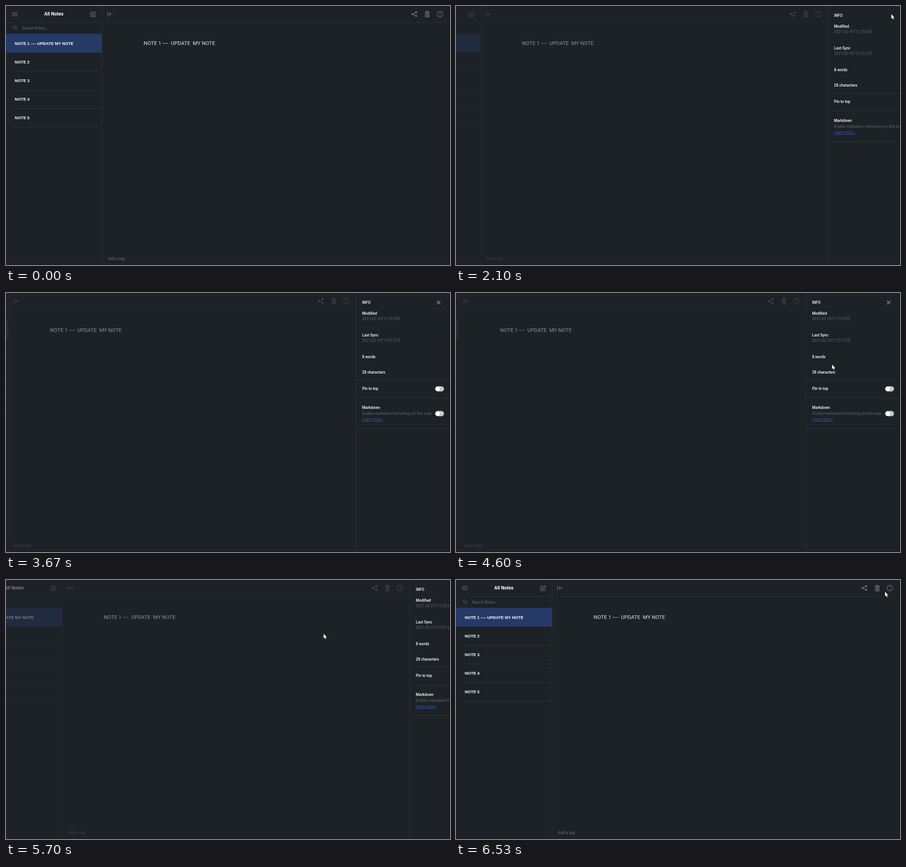
Recreate the animation shown at these times as an HTML page with a canvas. Size 978 by 572 pixels, loop 6590 ms.

```html
<!DOCTYPE html>
<html lang="en">
<head>
<meta charset="utf-8">
<title>Notes</title>
<style>
html, body { margin: 0; width: 100%; height: 100%; overflow: hidden; background: #1d2226; }
canvas { display: block; width: 978px; height: 572px; }
</style>
</head>
<body>
<canvas id="stage" width="978" height="572"></canvas>
<script>
const ctx = document.getElementById('stage').getContext('2d');
const W = 978, H = 572, LOOP = 6590, PANEL = 206, PAD = 13.4;
const BG = '#1d2226', RULE = '#2b3135', MUTED = '#6d7175', ICON = '#777b7f', LINK = '#3556ad';
const SANS = 'Roboto, sans-serif', ARIAL = '"Liberation Sans", Arial, sans-serif';
const OPEN = 1964, CLOSE = 5591, SLIDE = 200;
const WANDER = 2330, LEAVE = 5030;

// Pointer keys: time, x, y of the tip
const keys = [
  [1630, 967, 12], [2100, 959, 18], [WANDER, 915, 24],
  [LEAVE, 865, 103], [5170, 892, 56], [5430, 629, 150],
  [5570, 629, 150], [5700, 699, 119], [6120, 945, 26], [LOOP, 945, 26]
];

const info = [
  { s: 'INFO', y: 21, head: true },
  { s: 'Modified', y: 44.8, head: true },
  { s: '2021-02-19T17:35:59Z', y: 57.2 },
  { s: 'Last Sync', y: 93.2, head: true },
  { s: '2021-02-19T17:51:37Z', y: 105.4 },
  { s: '8 words', y: 141.5, head: true },
  { s: '28 characters', y: 175, head: true },
  { s: 'Pin to top', y: 211, head: true },
  { s: 'Markdown', y: 253.4, head: true },
  { s: 'Enable markdown formatting on this note.', y: 266.3 }
];

const clamp = v => Math.max(0, Math.min(1, v));
const smooth = v => { v = clamp(v); return v * v * (3 - 2 * v); };
const mix = (a, b, p) => a + (b - a) * p;
const slide = t => PANEL * (smooth((t - OPEN) / SLIDE) - smooth((t - CLOSE) / SLIDE));

function text(s, x, y, size, color, weight = 400, family = SANS) {
  ctx.font = `${weight} ${size}px ${family}`;
  ctx.fillStyle = color;
  ctx.fillText(s, x, y + size * 0.355);
}

function rect(x, y, w, h, color) {
  ctx.fillStyle = color;
  ctx.fillRect(x, y, w, h);
}

function stroke(d, color = ICON, width = 1.1) {
  ctx.strokeStyle = color;
  ctx.lineWidth = width;
  ctx.stroke(new Path2D(d));
}

function dot(x, y, r, color) {
  ctx.fillStyle = color;
  ctx.beginPath();
  ctx.arc(x, y, r, 0, 7);
  ctx.fill();
}

function ring(x, y, r) {
  ctx.strokeStyle = ICON;
  ctx.lineWidth = 1.1;
  ctx.beginPath();
  ctx.arc(x, y, r, 0, 7);
  ctx.stroke();
}

function sidebar() {
  stroke('M13.3 14.5h12.4m-12.4 3.5h12.4m-12.4 3.5h12.4');
  text('All Notes', 84.3, 17.7, 10.29, '#fff', 700);
  stroke('M192.5 13.3h-6v10.4h10v-5M188.5 16.5h4m-4 2.2h6m-6 2.2h6M195.6 12v5.4m-2.7-2.7h5.4', ICON, 1);

  ctx.save();
  ctx.globalAlpha *= 0.65;
  ring(19.2, 47.2, 3.2);
  stroke('M21.6 49.6l3.4 3.4');
  ctx.restore();
  text('Search Notes…', 34.8, 48.5, 8.6, '#63686c');

  rect(0, 61.5, 211, 41.5, '#263a68');
  ['1 ---- UPDATE MY NOTE', '2', '3', '4', '5'].forEach((s, i) => {
    const y = 82.5 + i * 41.15;
    text('NOTE ' + s, 19.2, y, 9, '#fff', 700, ARIAL);
    if (i) rect(19, Math.round(y + 20.3), 192, 1, RULE);
  });
}

function toolbar() {
  stroke('M223.7 12.8v10.4m2.8-5.2h8.8m-5.3-3.3l-3.3 3.3l3.3 3.3');

  stroke('M903.4 13.9l-7.8 4.1l7.8 4.1');
  dot(903.4, 13.9, 2.1, ICON);
  dot(895.6, 18, 2.1, ICON);
  dot(903.4, 22.1, 2.1, ICON);

  stroke('M922.8 13.3h10.4m-7.2-1.1h4M924.2 15.6v8.4h7.6v-8.4zm2 2.1l3.6 3.8m0-3.8l-3.6 3.8', ICON, 1.3);

  ring(956, 18, 6.1);
  stroke('M956 17.3v3.9m0-6.6v1.3');

  text('Add a tag', 224.2, 557.8, 8.8, MUTED);
}

function toggle(y) {
  const x = PANEL - 31.8;
  ctx.fillStyle = '#c6c8ca';
  ctx.beginPath();
  ctx.roundRect(x, y - 5.8, 19.6, 11.6, 5.8);
  ctx.fill();
  dot(x + 5.8, y, 4.9, '#fff');
}

// Drawn with its left border at x = 0
function panel() {
  rect(0, 0, PANEL + 1, H, BG);
  rect(0, 0, 1, H, RULE);
  for (const y of [192, 232, 299]) rect(0, y, PANEL, 1, RULE);

  for (const { s, y, head } of info) {
    text(s, PAD, y, 8.3, head ? '#fff' : '#60656a', head ? 500 : 400);
  }
  text('Learn more…', PAD, 279.3, 8.3, LINK);
  rect(PAD, 283, 47, 1, LINK);

  stroke('M177.8 17l8.2 8.2m0-8.2l-8.2 8.2', '#a4a7aa');
  toggle(211.7);
  toggle(266.4);
}

// A shrinking, then growing, swing over the info lines
function wander(t) {
  const u = (t - WANDER) / 700;
  const reach = Math.abs(1 - u / 2.3);
  return [
    805 + 110 * reach * Math.cos(Math.PI * u) ** 2,
    160 - 136 * reach * Math.cos(2 * Math.PI * u)
  ];
}

function tip(t) {
  if (t > WANDER && t < LEAVE) return wander(t);
  const i = keys.findIndex(k => k[0] > t);
  const [t0, x0, y0] = keys[i - 1], [t1, x1, y1] = keys[i];
  const p = (t - t0) / (t1 - t0);
  return [mix(x0, x1, p), mix(y0, y1, p)];
}

// The text caret pointer is invisible on the dark panel
function overText(x, y, shift) {
  const dx = x - (W - shift);
  return shift === PANEL && dx > PAD && dx < 85 && info.some(l => Math.abs(y - l.y) < 7);
}

function pointer(t, shift) {
  if (t < keys[0][0]) return;
  const [x, y] = tip(t);
  if (overText(x, y, shift)) return;
  ctx.save();
  ctx.translate(x, y);
  stroke('M0 0v10l2.3-2l1.7 3.7l1.7-.7l-1.6-3.6h2.9z', '#0b0d0e', 1);
  ctx.fillStyle = '#fff';
  ctx.fill(new Path2D('M0 0v10l2.3-2l1.7 3.7l1.7-.7l-1.6-3.6h2.9z'));
  ctx.restore();
}

function draw(t) {
  const shift = slide(t);
  const dim = clamp(shift / 60);
  rect(0, 0, W, H, BG);

  ctx.save();
  ctx.translate(-shift, 0);
  ctx.globalAlpha = mix(1, 0.4, dim);
  rect(0, 36, W, 1, RULE);
  rect(211, 0, 1, H, RULE);
  sidebar();
  toolbar();
  ctx.globalAlpha = mix(1, 0.58, dim);
  text('NOTE 1 ----\u00a0 UPDATE\u00a0 MY NOTE', 303, 81.7, 11.57, '#e6e7e8');
  ctx.restore();

  ctx.save();
  ctx.translate(977 - shift, 0);
  panel();
  ctx.restore();

  rect(977, 0, 1, H, '#0a0c0d');
  rect(0, 571, W, 1, '#15191b');
  pointer(t, shift);
}

function tick() {
  draw(performance.now() % LOOP);
  requestAnimationFrame(tick);
}
tick();
</script>
</body>
</html>
```
